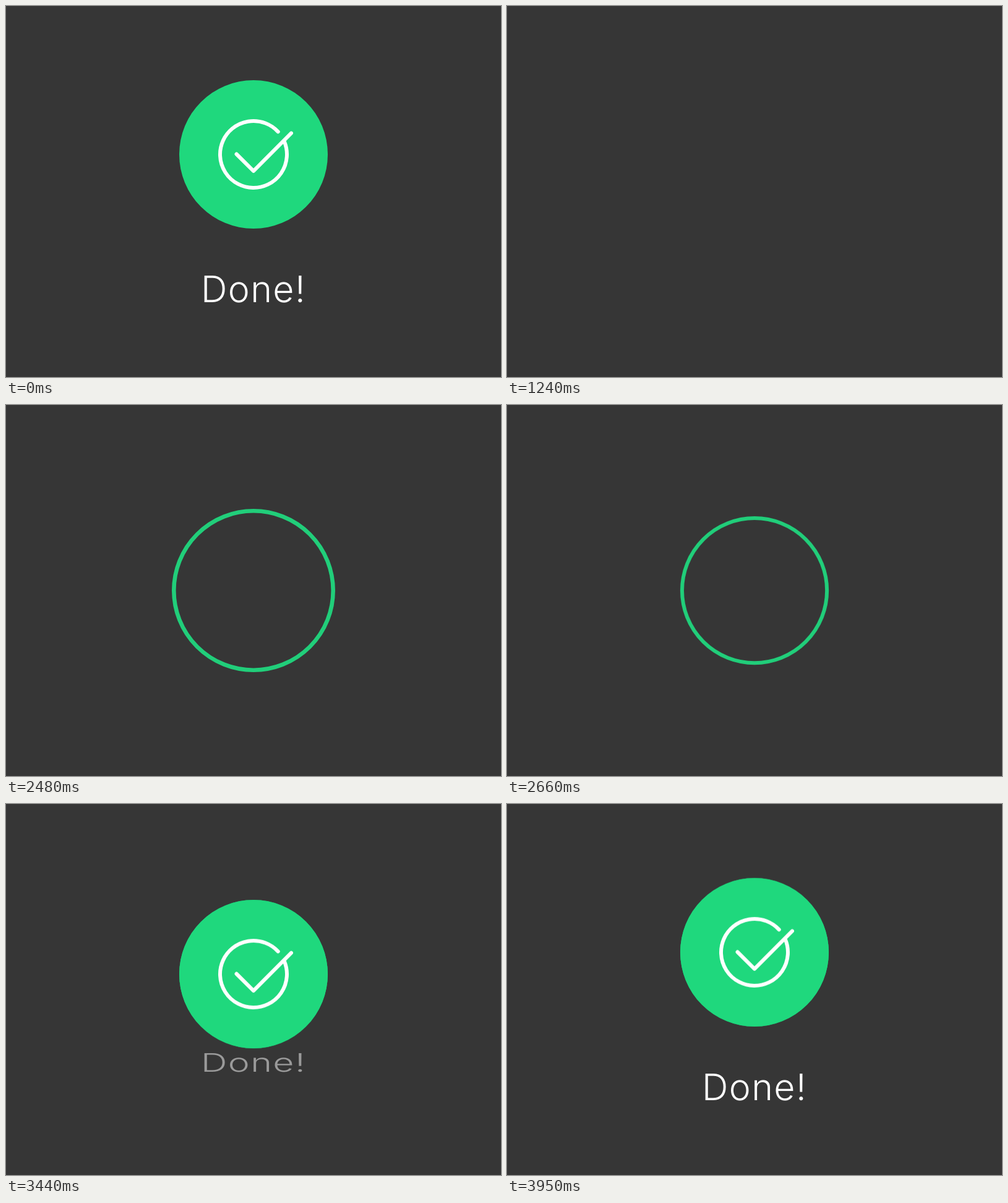
Recreate the animation shown at these times as an HTML page. Size 800 px wide and 600 px high, loop 3980 ms.

```html
<!DOCTYPE html>
<html lang="en">
<head>
<meta charset="utf-8">
<title>Done</title>
<style>
  html, body {
    margin: 0;
    width: 100%;
    height: 100%;
    overflow: hidden;
    background: #363636;
  }
  svg { display: block; width: 100%; height: 100%; }

  .lift, .ring, .badge, .icon path, .label {
    animation: 3980ms linear infinite;
    transform-origin: 0 0;
  }
  .lift { animation-name: lift; }
  .ring {
    animation-name: ring;
    fill: none;
    stroke: #21ce7a;
    stroke-width: 6;
  }
  .badge { animation-name: badge; }
  .disc { fill: #1fd87d; }
  .icon path {
    animation-name: draw;
    fill: none;
    stroke: #fff;
    stroke-width: 6;
    stroke-linecap: round;
    stroke-linejoin: round;
    stroke-dasharray: 322 400;
  }
  .label {
    animation-name: label;
    font: 350 59px Inter, Lato, "Open Sans", sans-serif;
    letter-spacing: 1.4px;
    fill: #fff;
    text-rendering: geometricPrecision;
  }

  /* the badge rises with a small overshoot to make room for the label */
  @keyframes lift {
    0%, 31.2% { transform: translateY(-60px); }
    31.3% { transform: translateY(0); }
    84.925% {
      transform: translateY(0);
      animation-timing-function: cubic-bezier(.3333, 1.5672, .6667, 1);
    }
    100% { transform: translateY(-60px); }
  }
  @keyframes ring {
    0% { transform: scale(0); }
    55.779% {
      transform: scale(0);
      animation-timing-function: cubic-bezier(.3333, 1.5672, .6667, 1);
    }
    67.085%, 100% { transform: scale(1); }
  }
  @keyframes badge {
    0% { transform: scale(1); }
    24.749% {
      transform: scale(1);
      animation-timing-function: cubic-bezier(.3333, 0, .6667, -.5672);
    }
    31.156% { transform: scale(0); }
    67.085% {
      transform: scale(0);
      animation-timing-function: cubic-bezier(.3333, 1.5672, .6667, 1);
    }
    78.392%, 100% { transform: scale(1); }
  }
  @keyframes draw {
    0%, 31.2% { stroke-dashoffset: 0; opacity: 1; }
    31.3%, 72.36% { stroke-dashoffset: 322; opacity: 0; }
    72.38% {
      stroke-dashoffset: 322;
      opacity: 1;
      animation-timing-function: cubic-bezier(.455, .03, .515, .955);
    }
    84.673%, 100% { stroke-dashoffset: 0; opacity: 1; }
  }
  @keyframes label {
    0% { transform: translateY(0) scaleY(1); opacity: 1; }
    24.749% {
      transform: translateY(0) scaleY(1);
      opacity: 1;
      animation-timing-function: cubic-bezier(.3333, 0, .6667, -.5672);
    }
    31.156% { transform: translateY(-80px) scaleY(.4); opacity: 0; }
    84.925% {
      transform: translateY(-80px) scaleY(.4);
      opacity: 0;
      animation-timing-function: cubic-bezier(.16, 1, .3, 1);
    }
    100% { transform: translateY(0) scaleY(1); opacity: 1; }
  }
</style>
</head>
<body>
<svg viewBox="-400 -300 800 600">
  <g transform="translate(0 158)">
    <text class="label" x="-85" y="21">Done!</text>
  </g>
  <g class="lift">
    <circle class="ring" r="117"/>
    <g class="badge">
      <circle class="disc" r="120"/>
      <g class="icon">
        <path d="M39.7 -36.6A54 54 0 1 0 49.9 -20.6"/>
        <path d="M-27.5 -.5L0 26.8L61 -34.3"/>
      </g>
    </g>
  </g>
</svg>
</body>
</html>
```
